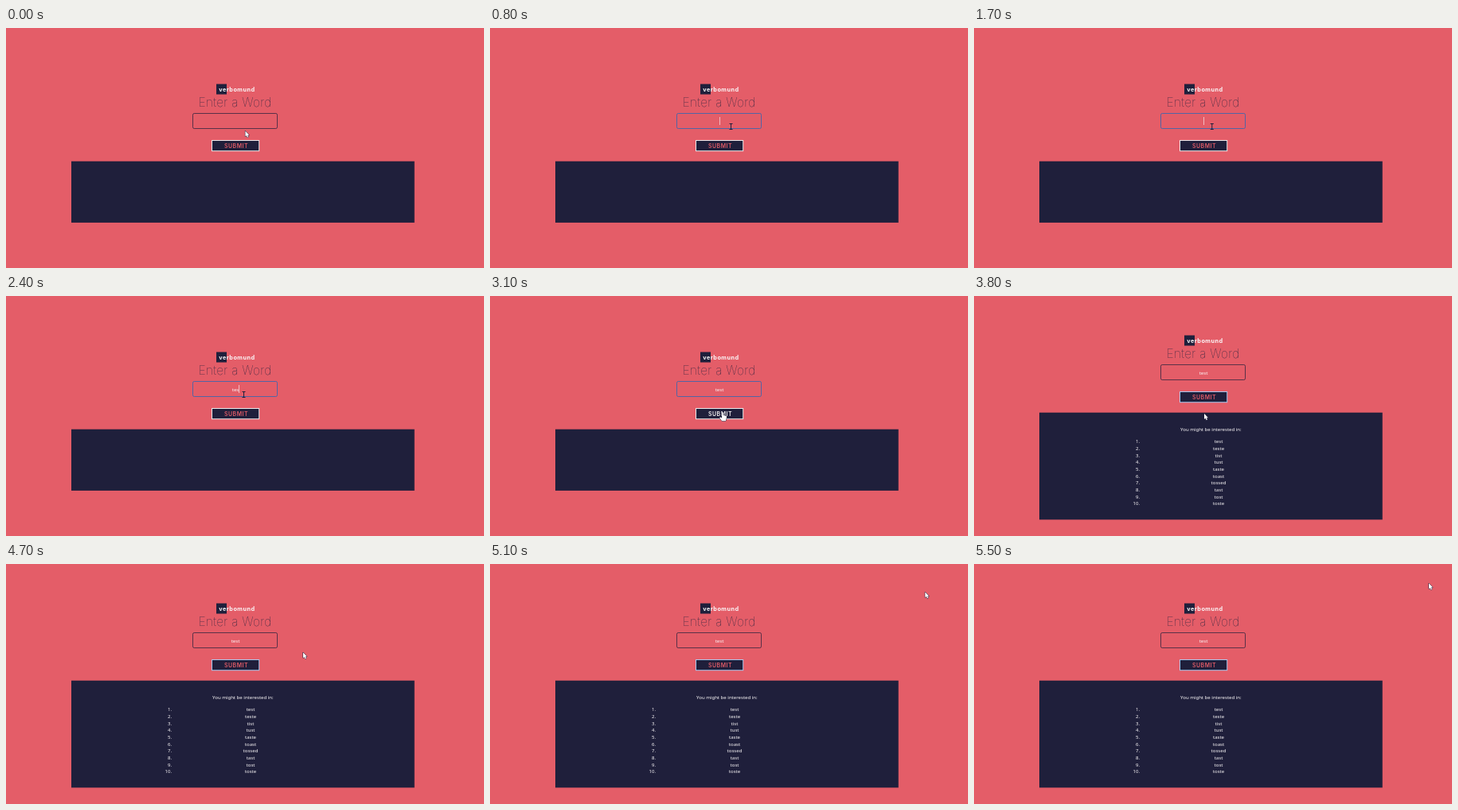
Animation of 600x302 px, one loop 5800 ms. Source, as an HTML page with a canvas:

```html
<!DOCTYPE html>
<html lang="en">
<head>
<meta charset="utf-8">
<title>Word search</title>
<style>
html, body { margin: 0; width: 100%; height: 100%; overflow: hidden; background: #e45d68; }
canvas { display: block; width: 600px; height: 302px; }
</style>
</head>
<body>
<canvas id="stage" width="600" height="302"></canvas>
<script>
const ctx = document.getElementById('stage').getContext('2d');
const LOOP = 5800, STEP = 100;
const RED = '#e45d68', NAVY = '#1f1f3b', WHITE = '#fbf8f9';
const BODY = '500 6.05px "Noto Sans", sans-serif';
const DISPLAY = 'Inter, sans-serif';
const WORD = 'test';
const SUGGESTIONS = ['test', 'teste', 'tist', 'tust', 'taste', 'toast', 'tossed', 'tast', 'tost', 'toste'];
const ENTER = 300, FOCUS = 500, TYPING = 2100, KEY_GAP = 150;
const LEAVE = 2800, HOVER = 3000, CLICK = 3600, RESULTS = 3800;

const MOVES = [
  { from: 0, to: 600, x: 302.5, y: 124 },
  { from: 1400, to: 1900, x: 298.5, y: 124 },
  { from: 2600, to: 3400, x: 291.5, y: 147 },
  { from: 3700, to: RESULTS, x: 288.6, y: 147.5 },
  { from: 4600, to: 5500, x: 570.6, y: 23.8 }
];

const clamp = (v, lo, hi) => Math.min(hi, Math.max(lo, v));
const easeOut = k => 1 - (1 - k) ** 3;

function pointerAt(t) {
  let x = 300, y = 129;
  for (const move of MOVES) {
    const k = easeOut(clamp((t - move.from) / (move.to - move.from), 0, 1));
    x += (move.x - x) * k;
    y += (move.y - y) * k;
  }
  return [x, y];
}

function text(str, x, y, font, color, align = 'center', spacing = 0) {
  ctx.font = font;
  ctx.fillStyle = color;
  ctx.textAlign = align;
  ctx.letterSpacing = spacing + 'px';
  ctx.fillText(str, x, y);
  ctx.letterSpacing = '0px';
}

function box(x, y, w, h, color) {
  ctx.fillStyle = color;
  ctx.fillRect(x, y, w, h);
}

function drawHeader() {
  box(264, 70.5, 13, 13, NAVY);
  text('verbomund', 267.3, 79.7, '700 7.3px ' + DISPLAY, WHITE, 'left', 0.45);
  text('Enter a Word', 287.6, 98.8, '100 15.3px ' + DISPLAY, NAVY, 'center', 0.35);
}

function drawInput(t) {
  const focused = t >= FOCUS && t < CLICK;
  ctx.beginPath();
  ctx.roundRect(234.5, 107.5, 106, 19, 1.8);
  ctx.strokeStyle = focused ? '#5264a5' : NAVY;
  ctx.lineWidth = focused ? 1 : 0.7;
  ctx.stroke();

  const count = clamp(Math.floor((t - TYPING) / KEY_GAP) + 1, 0, WORD.length);
  const typed = WORD.slice(0, count);
  text(typed, 288, 119.5, BODY, WHITE);
  const blinkStart = count ? TYPING + KEY_GAP * (count - 1) : FOCUS;
  const caretOn = Math.floor((t - blinkStart) / 500) % 2 === 0;
  if (focused && caretOn) {
    const x = Math.round(287.5 + ctx.measureText(typed).width / 2);
    box(x, 112, 0.8, 10, '#f6d5d8');
  }
}

function drawButton(t) {
  const hover = t >= HOVER && t < RESULTS;
  box(258, 141, 60.2, 14.2, t >= CLICK ? '#a9c8ee' : '#eceaec');
  box(259, 142, 58.2, 12.2, NAVY);
  text('SUBMIT', 289, 151.2, '600 6.9px ' + DISPLAY, hover ? WHITE : RED, 'center', 0.5);
}

function drawResults() {
  text('You might be interested in:', 297.4, 169.6, BODY, WHITE);
  SUGGESTIONS.forEach((word, i) => {
    const y = 185.2 + i * 8.67;
    text(i + 1 + '.', 208, y, BODY, WHITE, 'right');
    text(word, 307, y, BODY, WHITE);
  });
}

const ARROW = new Path2D('M.4 .5V7.6L2 6.2 3.1 8.7 4.3 8.1 3.3 5.8H5.3Z');
const HAND = new Path2D('M-.8 .8Q0 -.3 .8 .8V4.2L4.4 5Q5.4 5.3 5.2 6.8L4 11.4H-.8L-3.5 7.8Q-3.6 6.3 -2.2 6.8L-.8 8Z');
const BEAM = new Path2D('M-2 -3.5H2M0 -3.5V3.5M-2 3.5H2');

function drawPointer(t) {
  const overInput = t >= ENTER && t < LEAVE;
  const overButton = t >= HOVER && t < RESULTS;
  const shape = overInput ? BEAM : overButton ? HAND : ARROW;
  ctx.save();
  ctx.translate(...pointerAt(t));
  ctx.lineWidth = 1;
  ctx.lineJoin = 'round';
  ctx.strokeStyle = NAVY;
  ctx.stroke(shape);
  ctx.fillStyle = '#fff';
  if (!overInput) ctx.fill(shape);
  ctx.restore();
}

function draw(t) {
  const open = t >= RESULTS;
  box(0, 0, 600, 302, RED);
  box(82, open ? 146.7 : 167.7, 430.7, open ? 134.7 : 77.2, NAVY);
  ctx.save();
  ctx.translate(0, open ? -21 : 0);
  drawHeader();
  drawInput(t);
  drawButton(t);
  ctx.restore();
  if (open) drawResults();
  drawPointer(t);
}

const start = performance.now();
function tick() {
  const t = (performance.now() - start) % LOOP;
  draw(Math.floor(t / STEP) * STEP);
  requestAnimationFrame(tick);
}
tick();
</script>
</body>
</html>
```
